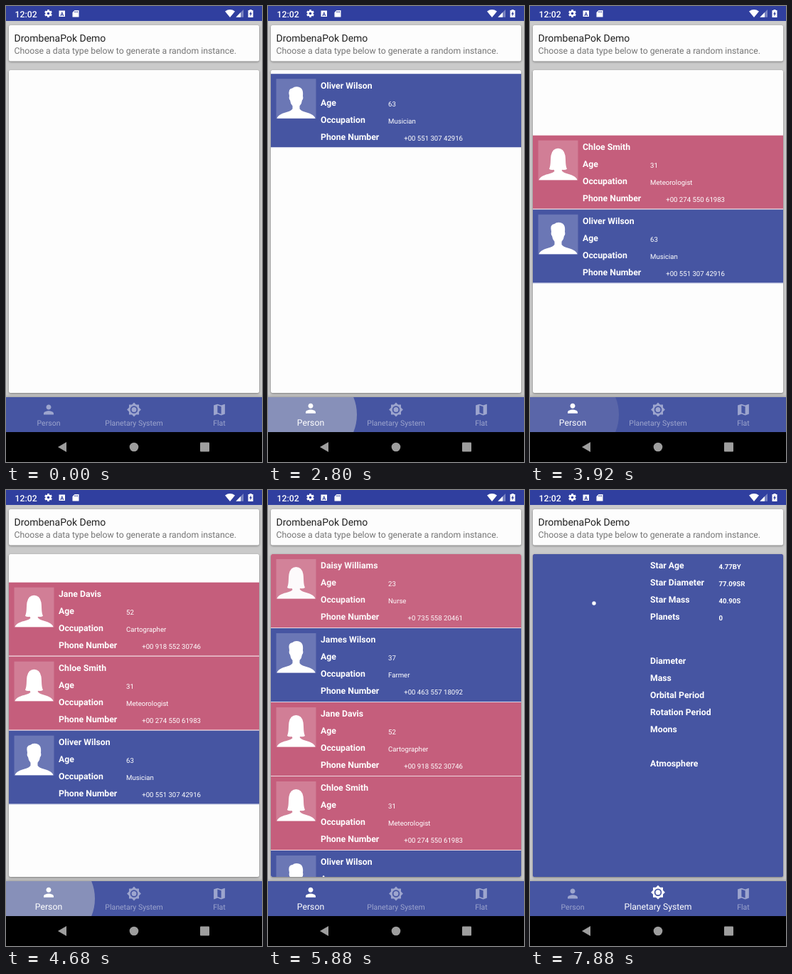
An HTML page with a canvas for the animation above (8 s loop, 360 px wide and 640 px high).

```html
<!DOCTYPE html>
<html lang="en">
<head>
<meta charset="utf-8">
<title>Random data demo</title>
<style>
html, body { margin: 0; width: 100%; height: 100%; overflow: hidden; background: #000; }
canvas { display: block; width: 360px; height: 640px; }
</style>
</head>
<body>
<canvas id="stage" width="360" height="640"></canvas>
<script>
const ctx = document.getElementById('stage').getContext('2d');
const LOOP = 8000, ROW = 104, LIST_TOP = 90;
const BLUE = '#4655a2', PINK = '#c55e7c', WHITE = '#fff';

// Oldest first. "move" starts pushing older rows down, "show" starts the fade-in.
const people = [
  { name: 'Oliver Wilson', age: 63, job: 'Musician', phone: '+00 551 307 42916', move: 0, show: 2215 },
  { name: 'Chloe Smith', age: 31, job: 'Meteorologist', phone: '+00 274 550 61983', female: true, move: 2765, show: 3015 },
  { name: 'Jane Davis', age: 52, job: 'Cartographer', phone: '+00 918 552 30746', female: true, move: 3727, show: 3977 },
  { name: 'James Wilson', age: 37, job: 'Farmer', phone: '+00 463 557 18092', move: 4575, show: 4825 },
  { name: 'Daisy Williams', age: 23, job: 'Nurse', phone: '+0 735 558 20461', female: true, move: 5527, show: 5777 }
];

const ripples = [
  { x: 60, down: 1600, up: 2200 }, { x: 60, down: 2560, up: 2830 },
  { x: 60, down: 3560, up: 3815 }, { x: 60, down: 4400, up: 4690 },
  { x: 60, down: 5320, up: 5600 }, { x: 180, down: 6400, up: 6680 },
  { x: 180, down: 7280, up: 7560 }
];

const icons = {
  person: new Path2D('M12 12c2.21 0 4-1.79 4-4s-1.79-4-4-4-4 1.79-4 4 1.79 4 4 4zm0 2c-2.67 0-8 1.34-8 4v2h16v-2c0-2.66-5.33-4-8-4z'),
  sun: new Path2D('M20 8.69V4h-4.69L12 .69 8.69 4H4v4.69L.69 12 4 15.31V20h4.69L12 23.31 15.31 20H20v-4.69L23.31 12zM12 18a6 6 0 1 1 0-12 6 6 0 0 1 0 12zM12 8a4 4 0 1 0 0 8 4 4 0 0 0 0-8z'),
  map: new Path2D('M20.5 3L15 5.1 9 3 3.36 4.9Q3 5 3 5.4V20.5q0 .5.5.5L9 18.9l6 2.1 5.64-1.9q.36-.1.36-.5V3.5q0-.5-.5-.5zM15 19l-6-2.11V5l6 2.11z')
};

const shoulders = 'C21 46 12 47 7 49.5Q2 52 1 55.5H55Q54 52 49 49.5C44 47 35 46 33 42';
const male = new Path2D('M23 42' + shoulders +
  'V38Q36 35 36.5 30Q38.5 28 37.5 24C38.5 16 36 11 28.5 11Q25 11 23 13Q16 13.5 18.5 24Q17.5 28 19.5 30Q20 35 23 38z');
const female = new Path2D('M23 43' + shoulders +
  'L34 41Q38 42 40.5 40C38 34 39 28 38 21Q36 11 28 11Q20 11 18 21C17 28 18 34 15.5 40Q18 42 22 41z');

const clamp = v => Math.min(1, Math.max(0, v));
const ramp = (t, start, length) => clamp((t - start) / length);
const smooth = v => 0.5 - 0.5 * Math.cos(Math.PI * v);
const mix = (a, b, k) => a + (b - a) * k;

function rect(x, y, w, h, color) {
  ctx.fillStyle = color;
  ctx.fillRect(x, y, w, h);
}

function disc(x, y, r, color) {
  ctx.fillStyle = color;
  ctx.beginPath();
  ctx.arc(x, y, r, 0, 2 * Math.PI);
  ctx.fill();
}

function poly(points, color) {
  ctx.fillStyle = color;
  ctx.beginPath();
  points.forEach(([x, y]) => ctx.lineTo(x, y));
  ctx.fill();
}

function text(value, x, y, size, color = WHITE, weight = 400, align = 'left') {
  ctx.font = `${weight} ${size}px Roboto, sans-serif`;
  ctx.textRendering = 'geometricPrecision';
  ctx.textAlign = align;
  ctx.fillStyle = color;
  ctx.fillText(value, x, y);
}

const label = (value, x, y) => text(value, x, y, 12.25, WHITE, 700);

function shape(path, x, y, scale, color) {
  ctx.save();
  ctx.translate(x, y);
  ctx.scale(scale, scale);
  ctx.fillStyle = color;
  ctx.fill(path, 'evenodd');
  ctx.restore();
}

function cardPath(y, h) {
  ctx.beginPath();
  ctx.roundRect(4, y, 352, h, 2.5);
}

function card(y, h) {
  ctx.save();
  ctx.shadowColor = 'rgba(0,0,0,.4)';
  ctx.shadowBlur = 3;
  ctx.shadowOffsetY = 1;
  ctx.fillStyle = '#fdfdfd';
  cardPath(y, h);
  ctx.fill();
  ctx.restore();
}

function statusBar() {
  rect(0, 0, 360, 21, '#303f9f');
  text('12:02', 12.5, 15.5, 12.25, WHITE, 500);

  for (let i = 0; i < 6; i++) {
    ctx.save();
    ctx.translate(59.5, 10.5);
    ctx.rotate(i * Math.PI / 3);
    rect(-1.4, -5.4, 2.8, 4, WHITE);
    ctx.restore();
  }
  disc(59.5, 10.5, 4, WHITE);
  disc(59.5, 10.5, 1.8, '#303f9f');

  rect(74.5, 6.5, 8.5, 8.5, WHITE);
  text('A', 78.7, 13.6, 7.5, '#303f9f', 700, 'center');

  poly([[96.5, 6], [102.5, 6], [102.5, 15.5], [93.5, 15.5], [93.5, 9]], WHITE);
  for (let i = 0; i < 3; i++) rect(96.3 + i * 1.9, 7.3, 0.9, 2, '#303f9f');

  ctx.fillStyle = WHITE;
  ctx.beginPath();
  ctx.moveTo(315, 16);
  ctx.lineTo(308, 7.5);
  ctx.quadraticCurveTo(315, 2.6, 322, 7.5);
  ctx.fill();

  poly([[334, 5], [334, 15.7], [323.3, 15.7]], 'rgba(255,255,255,.35)');
  poly([[330, 9], [330, 15.7], [323.3, 15.7]], WHITE);

  rect(342.5, 5, 3, 2, WHITE);
  rect(340.5, 6, 7, 10, WHITE);
  poly([[344.6, 7.5], [342, 11.6], [343.6, 11.6], [343.4, 14.5], [346, 10.3], [344.6, 10.3]], '#303f9f');
}

function personRow(p, y) {
  rect(4, y, 352, 103, p.female ? PINK : BLUE);
  rect(4, y + 103, 352, 1, p.female ? '#f0d6de' : '#d3d7ea');
  rect(11.5, y + 7, 56, 56, 'rgba(255,255,255,.2)');
  shape(p.female ? female : male, 11.5, y + 7, 1, WHITE);
  [p.name, 'Age', 'Occupation', 'Phone Number'].forEach((s, i) => label(s, 74, y + 20.4 + i * 24));
  text(p.age, 169, y + 45.4, 9.625);
  text(p.job, 169, y + 69.4, 9.625);
  text(p.phone, 274, y + 93.4, 9.625, WHITE, 400, 'right');
}

function personList(t) {
  let y = LIST_TOP;
  for (let i = people.length - 1; i >= 0; i--) {
    const p = people[i];
    const alpha = smooth(ramp(t, p.show, 120));
    if (alpha > 0 && y < 543) {
      ctx.globalAlpha = alpha;
      personRow(p, y);
      ctx.globalAlpha = 1;
    }
    y += ROW * smooth(ramp(t, p.move, 250));
  }
}

function planetarySystem(t, alpha) {
  const values = t < 7490 ? ['2.31BY', '58.46SR', '23.75S', '0'] : ['4.77BY', '77.09SR', '40.90S', '0'];
  ctx.globalAlpha = alpha;
  rect(4, LIST_TOP, 352, 453, BLUE);
  disc(90, 159, 2.7, WHITE);
  ['Star Age', 'Star Diameter', 'Star Mass', 'Planets'].forEach((s, i) => {
    label(s, 169, 110.4 + i * 24);
    text(values[i], 265.5, 111.4 + i * 24, 9.625, WHITE, 700);
  });
  ['Diameter', 'Mass', 'Orbital Period', 'Rotation Period', 'Moons'].forEach((s, i) => label(s, 169, 244.4 + i * 24));
  label('Atmosphere', 169, 388.4);
  ctx.globalAlpha = 1;
}

function content(t) {
  card(LIST_TOP, 453);
  ctx.save();
  cardPath(LIST_TOP, 453);
  ctx.clip();
  personList(t);
  const fade = smooth(ramp(t, 6640, 380));
  if (fade > 0) planetarySystem(t, fade);
  ctx.restore();
}

function ripple(r, t) {
  if (t < r.down || t >= r.up + 150) return;
  const grow = 1 - (1 - ramp(t, r.down, 225)) ** 2;
  const alpha = 0.55 * ramp(t, r.down - 15, 75) * (1 - ramp(t, r.up, 150));
  disc(mix(r.x + 5, r.x, grow), 573.5, mix(36.5, 65, grow), `rgba(190,193,205,${alpha})`);
}

function tab(name, icon, x, selected) {
  const color = `rgba(255,255,255,${mix(0.47, 1, selected)})`;
  shape(icons[icon], x - 10.5, mix(556, 554.2, selected), 0.875, color);
  text(name, x, 589.4, mix(10.5, 12.25, selected), color, 400, 'center');
}

function tabBar(t) {
  ctx.save();
  ctx.shadowColor = 'rgba(0,0,0,.35)';
  ctx.shadowBlur = 5;
  rect(0, 549, 360, 49, BLUE);
  ctx.restore();

  ctx.save();
  ctx.beginPath();
  ctx.rect(0, 549, 360, 49);
  ctx.clip();
  ripples.forEach(r => ripple(r, t));
  ctx.restore();

  const change = ramp(t, 6600, 115);
  tab('Person', 'person', 60, ramp(t, 2200, 115) * (1 - change));
  tab('Planetary System', 'sun', 180, change);
  tab('Flat', 'map', 300, 0);
}

function systemKeys() {
  const gray = '#9e9e9e';
  rect(0, 598, 360, 42, '#000');
  poly([[73, 619], [85, 612], [85, 626]], gray);
  disc(180, 619, 6.3, gray);
  ctx.beginPath();
  ctx.roundRect(273, 612.5, 13, 13, 1);
  ctx.fill();
}

function draw(t) {
  rect(0, 0, 360, 640, '#cacaca');
  statusBar();
  card(27, 50.5);
  text('DrombenaPok Demo', 11.5, 49.6, 14, '#212121');
  text('Choose a data type below to generate a random instance.', 11.5, 66.5, 12.25, '#757575');
  content(t);
  tabBar(t);
  systemKeys();
}

const start = performance.now();
function tick() {
  draw((performance.now() - start) % LOOP);
  requestAnimationFrame(tick);
}
tick();
</script>
</body>
</html>
```
